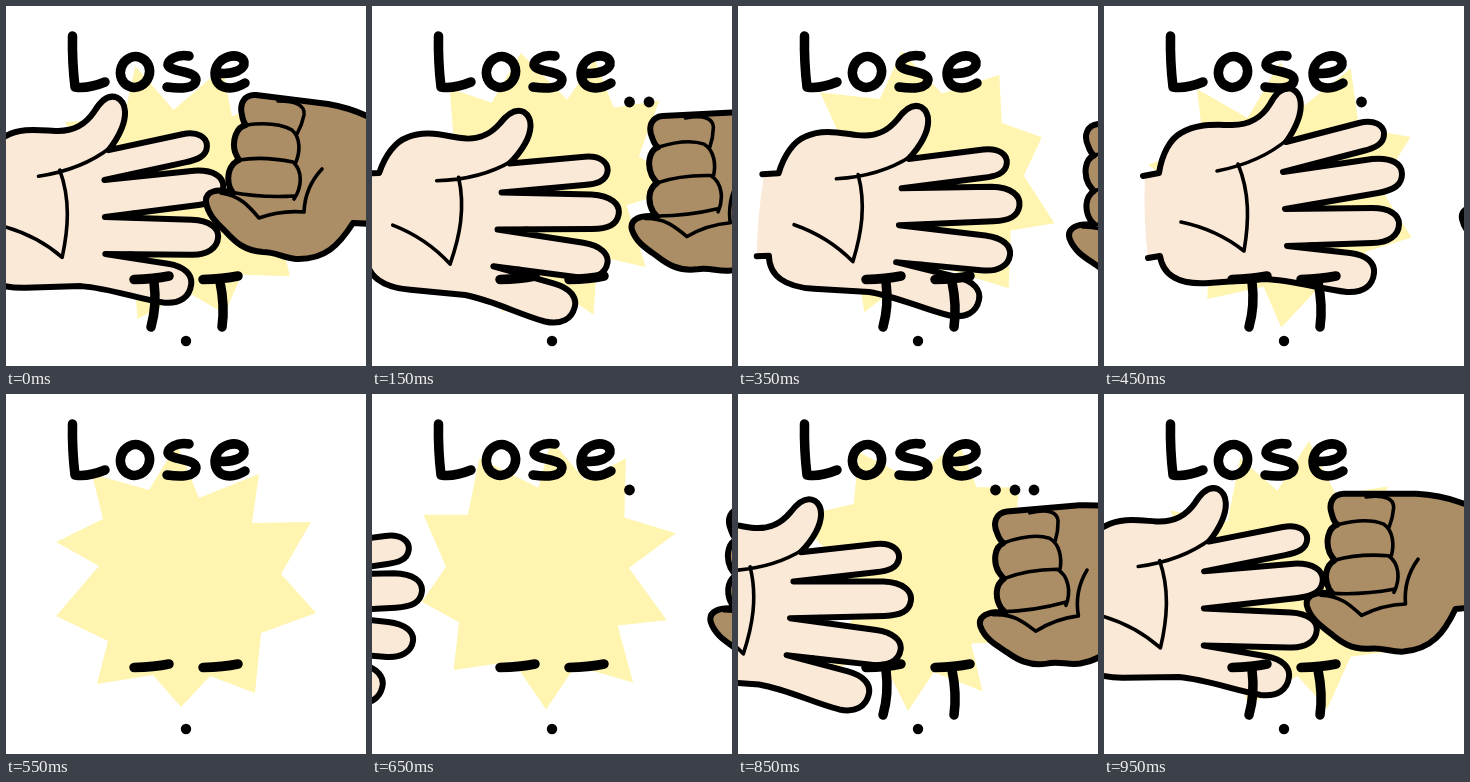
An HTML page that plays this animation: 360x360 px, repeating every 1 s.

```html
<!DOCTYPE html>
<html lang="en">
<head>
<meta charset="utf-8">
<title>Lose</title>
<style>
html, body { margin: 0; width: 100%; height: 100%; overflow: hidden; background: #fff; }
svg { display: block; width: 100vw; height: 100vh; }
.line { fill: none; stroke: #000; stroke-width: 3.6; stroke-linecap: round; stroke-linejoin: round; }
.edge { stroke-width: 6; }
.ink { fill: none; stroke: #000; stroke-width: 9.5; stroke-linecap: round; stroke-linejoin: round; }
</style>
</head>
<body>
<svg viewBox="0 0 360 360" role="img" aria-label="Lose... T.T">
  <path id="star" fill="#fff5b0" d="M86 80 L143 96 171 50 193 104 253 80 246 129 305 128 275 180 310 219 255 239 249 299 204 282 175 313 147 281 91 290 102 247 50 222 93 172 50 148 97 125Z"/>

  <g id="hand">
    <path id="palm" fill="#fbe9d7" d="M39 170 L55 167 C58 148 66 133 77 127 C93 117 110 119 128 119 C147 119 158 111 166 98 C172 87 179 80 188 83 C199 88 198 103 194 114 Q190 125 182 136 L255 117 C270 113 280 119 280 128 C280 138 271 142 259 145 L179 166 L268 153 C288 151 298 158 298 168 C298 179 290 184 274 187 L181 203 L268 202 C286 202 295 209 295 218 C295 229 285 237 268 237 L183 240 L246 247 C263 249 271 257 270 267 C269 279 260 287 243 286 C215 283 190 274 160 273 L105 277 C76 279 59 270 56 250 L44 252 Q39 212 41 170Z"/>
    <path class="line edge" d="M39 170 L55 167 C58 148 66 133 77 127 C93 117 110 119 128 119 C147 119 158 111 166 98 C172 87 179 80 188 83 C199 88 198 103 194 114 Q190 125 182 136 L255 117 C270 113 280 119 280 128 C280 138 271 142 259 145 L179 166 L268 153 C288 151 298 158 298 168 C298 179 290 184 274 187 L181 203 L268 202 C286 202 295 209 295 218 C295 229 285 237 268 237 L183 240 L246 247 C263 249 271 257 270 267 C269 279 260 287 243 286 C215 283 190 274 160 273 L105 277 C76 279 59 270 56 250 L44 252"/>
    <path d="M178 166 L208 156 211 163Z M180 203 L211 195 211 205Z M181 240 L210 236 211 245Z"/>
    <path class="line" d="M113 165 C139 160 164 150 184 133 M134 158 C146 187 145 216 140 245 C121 230 101 221 77 216"/>
  </g>

  <g id="fist">
    <path class="line edge" style="fill:#ab8d66" d="M430 140 L365 112 Q345 102 322 98 L250 89 C239 88 233 97 236 109 Q237 116 240 119 C230 121 226 135 229 146 Q231 151 233 154 C223 158 220 171 224 182 L227 187 C211 182 199 185 200 196 C202 209 211 217 220 226 C229 236 239 245 257 246 C270 246 277 252 290 253 C319 254 333 239 347 217 L430 221"/>
    <path class="line" d="M272 95 Q300 95 298 109 Q296 119 291 128 M240 119 Q270 115 286 124 C295 132 294 146 290 156 M233 154 Q257 150 287 156 C297 165 296 181 288 193 M224 186 Q255 192 288 190 M215 187 C234 190 242 199 253 212 Q275 204 298 206 Q299 181 316 163"/>
  </g>

  <g class="ink">
    <path d="M66.500 30 Q66 56 69 81 Q82 83 99 76"/>
    <ellipse cx="129" cy="66" rx="14.500" ry="15.500" transform="rotate(20 129 66)"/>
    <path d="M183 50 C170 48 162 54 162 59 C165 67 190 64 190 74 C189 83 174 83 161 81"/>
    <path d="M211 67 C229 69 239 63 238 56 C235 45 210 49 209 67 C209 84 226 85 239 77"/>
    <path d="M128 273.500 Q148 273 163 270 M197 273.500 Q217 273 232 270"/>
    <path id="stemL" d="M148 276 Q151 300 145 321"/>
    <path id="stemR" d="M214 276 Q219 300 216 321"/>
  </g>
  <g id="dots">
    <circle cx="257.500" cy="96" r="5.400"/>
    <circle cx="277" cy="96" r="5.400"/>
    <circle cx="296" cy="96" r="5.400"/>
  </g>
  <circle cx="180" cy="335" r="5.200"/>
</svg>
<script>
const STEP = 50, COUNT = 20, START = 11;
const el = id => document.getElementById(id);
const star = el('star'), hand = el('hand'), fist = el('fist');
const stemL = el('stemL'), stemR = el('stemR');
const dots = [...el('dots').children];

// step, x, y, angle
const handKeys = [
  [0, -45, 198, 0], [4, 88.5, 242.5, 11.2], [8, 194, 215, 3.4], [9, 193, 210, 2.4],
  [12, 219, 234, 9.5], [14, 235, 249, 13.5], [18, 275, 198, 0], [19, 284, 190, -1]
];
const fistKeys = [
  [0, 392, 205, -4], [4, 288, 243, -14], [8, 203, 212, -7], [9, 200, 196, 0],
  [12, 260, 224, -10], [14, 303, 245, -16], [18, 358, 213, -4], [19, 374, 200, -1]
];

// Smooth curve through unevenly spaced keys
function pose(keys, s) {
  const last = keys.length - 1;
  let i = 0;
  while (i < last - 1 && keys[i + 1][0] <= s) i++;
  const a = keys[i], b = keys[i + 1], h = b[0] - a[0], u = (s - a[0]) / h;
  const slope = (j, c) => {
    const p = keys[Math.max(j - 1, 0)], q = keys[Math.min(j + 1, last)];
    return (q[c] - p[c]) / (q[0] - p[0]);
  };
  const u2 = u * u, u3 = u2 * u;
  return [1, 2, 3].map(c =>
    (2 * u3 - 3 * u2 + 1) * a[c] + (u3 - 2 * u2 + u) * h * slope(i, c) +
    (3 * u2 - 2 * u3) * b[c] + (u3 - u2) * h * slope(i + 1, c));
}

function place(node, keys, s, px, py) {
  const [x, y, r] = pose(keys, s);
  node.setAttribute('transform', `translate(${x} ${y}) rotate(${r}) translate(${-px} ${-py})`);
}

const show = (node, on) => node.setAttribute('visibility', on ? 'visible' : 'hidden');

function draw(ms) {
  const s = (Math.floor(ms / STEP) + COUNT - START) % COUNT;
  star.setAttribute('transform', `rotate(${s * 720 / (COUNT - 1)} 180 180)`);
  place(hand, handKeys, s, 275, 198);
  place(fist, fistKeys, s, 200, 196);
  const tear = s % 10, shown = Math.floor(s / 2) % 4;
  show(stemL, tear >= 4);
  show(stemR, tear >= 6);
  dots.forEach((d, i) => show(d, i < shown));
}

const t0 = performance.now();
function tick() {
  draw((performance.now() - t0) % (STEP * COUNT));
  requestAnimationFrame(tick);
}
draw(0);
requestAnimationFrame(tick);
</script>
</body>
</html>
```
